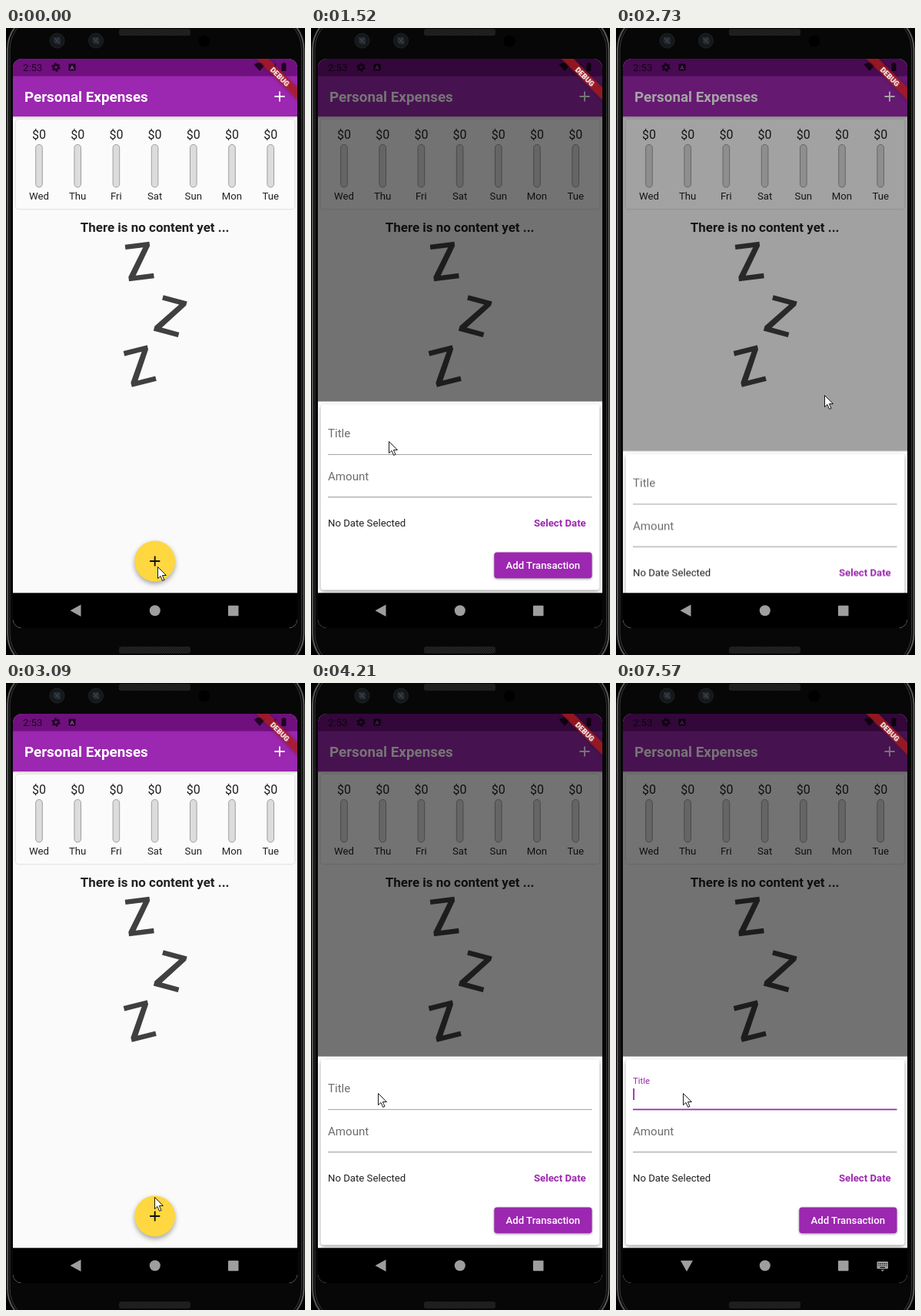
These frames come from a looping animation (389x815 px, 8 s). An HTML page:

```html
<!DOCTYPE html>
<html lang="en">
<head>
<meta charset="utf-8">
<title>Personal Expenses</title>
<style>
html, body { margin: 0; width: 100%; height: 100%; overflow: hidden; background: #000; }
svg { display: block; width: 389px; height: 815px; font-family: Roboto, sans-serif; font-size: 13.19px; }
.mid { text-anchor: middle; }
.bold { font-weight: 700; }
.ink { fill: #212121; }
.hint { fill: #6d6d6d; font-size: 15.07px; }
.purple { fill: #9c27b0; }
.card { fill: #fbfbfb; filter: drop-shadow(0 .8px .8px rgba(0,0,0,.25)); }
.form { fill: #fff; filter: drop-shadow(0 2px 2.5px rgba(0,0,0,.38)); }
.fab { fill: #ffd740; filter: drop-shadow(0 3px 3px rgba(0,0,0,.35)); }
.button { fill: #9c27b0; filter: drop-shadow(0 1.5px 1.5px rgba(0,0,0,.4)); }
.banner { fill: rgba(183,28,28,.74); filter: drop-shadow(0 0 2.5px rgba(0,0,0,.35)); }

#cursor, #sheet, #scrim, #label, #line, #caret, #back, #down { animation: 8s step-end infinite; }
#cursor { animation-name: cursor; }
#sheet { animation-name: sheet; }
#scrim { animation-name: scrim; }
#label { animation-name: label; }
#line { animation-name: line; }
#caret { animation-name: caret; }
#back { animation-name: back; }
#down { animation-name: down; }

@keyframes cursor {
  0% { transform: translate(197px, 700px); }
  11.125% { transform: translate(213px, 702px); }
  12.625% { transform: translate(203px, 678px); }
  14.125% { transform: translate(164px, 614px); }
  15.625% { transform: translate(116px, 552px); }
  17.125% { transform: translate(91px, 528px); }
  19% { transform: translate(101px, 537px); }
  20.75% { transform: translate(105px, 541px); }
  22.25% { transform: translate(107px, 543px); }
  27.75% { transform: translate(214px, 563px); }
  29.625% { transform: translate(256px, 524px); }
  31.125% { transform: translate(269px, 484px); }
  32.625%, 34.125% { transform: translate(271px, 477px); }
  35.625% { transform: translate(267px, 494px); }
  37.125% { transform: translate(226px, 590px); }
  38.625% { transform: translate(193px, 668px); }
  40.125%, 43.25% { transform: translate(201px, 692px); }
  44.75% { transform: translate(190px, 672px); }
  46.25% { transform: translate(118px, 566px); }
  47.75% { transform: translate(75px, 513px); }
  49.625% { transform: translate(81px, 524px); }
  51.125% { transform: translate(86px, 531px); }
  52.625%, 100% { transform: translate(87px, 533px); }
}
@keyframes sheet {
  0% { transform: translateY(250px); }
  3.125% { transform: translateY(95.5px); }
  4.625% { transform: none; }
  34.125% { transform: translateY(64.5px); }
  35.625% { transform: translateY(205px); }
  37.125% { transform: translateY(250px); }
  43.25% { transform: translateY(95.5px); }
  44.75%, 100% { transform: none; }
}
@keyframes scrim {
  0% { opacity: 0; }
  3.125% { opacity: .47; }
  4.625% { opacity: 1; }
  34.125% { opacity: .66; }
  35.625% { opacity: .15; }
  37.125% { opacity: 0; }
  43.25% { opacity: .47; }
  44.75%, 100% { opacity: 1; }
}
@keyframes label {
  0% { transform: translate(22px, 532px); fill: #6d6d6d; }
  59.5% { transform: translate(22px, 529px) scale(.93); fill: #7b5a81; }
  61% { transform: translate(22px, 521.5px) scale(.76); fill: #992ba8; }
  62.5%, 100% { transform: translate(22px, 521px) scale(.75); fill: #9c27b0; }
}
@keyframes line {
  0% { stroke: #a0a0a0; stroke-width: 1px; }
  59.5% { stroke: #956c9e; stroke-width: 1.4px; }
  61%, 100% { stroke: #9c27b0; stroke-width: 1.9px; }
}
@keyframes caret {
  0% { opacity: 0; }
  59.5% { opacity: 1; }
  64% { opacity: 0; }
  70.25% { opacity: 1; }
  75.125% { opacity: 0; }
  81.5% { opacity: 1; }
  88.125% { opacity: 0; }
  94.625%, 100% { opacity: 1; }
}
@keyframes back { 0% { opacity: 1; } 84.625%, 100% { opacity: 0; } }
@keyframes down { 0% { opacity: 0; } 84.625%, 100% { opacity: 1; } }
</style>
</head>
<body>
<svg viewBox="0 0 389 815">
  <defs>
    <clipPath id="screen"><rect x="9" y="40" width="370" height="740" rx="12"/></clipPath>
    <pattern id="mesh" width="3" height="3" patternUnits="userSpaceOnUse">
      <rect width="3" height="3" fill="#262626"/><path d="M0 3L3 0" stroke="#101010"/>
    </pattern>
    <path id="z" d="M-16-24H16V-18.5L-7 17.5H16.5V24H-16.5V18L7-17.5H-16Z"/>
    <path id="plus" d="M-6.6 0H6.6M0-6.6V6.6" fill="none" stroke-width="1.9"/>
    <g id="lens">
      <circle r="9.5" fill="#15181b" stroke="#202427"/>
      <circle r="5" fill="#23282d"/>
      <path d="M-4-4L4 4M3-4L-2 2" stroke="#3a4148" stroke-width="1.3"/>
    </g>
  </defs>

  <!-- phone body -->
  <rect x="2" y="-20" width="385.5" height="855" rx="48" fill="#070707" stroke="#585858" stroke-width="2"/>
  <rect x="5" y="-17" width="379.5" height="849" rx="45" fill="none" stroke="#3a3a3a"/>
  <rect x="147" y="1" width="93" height="9" rx="3" fill="url(#mesh)"/>
  <rect x="147" y="804" width="93" height="9" rx="3" fill="url(#mesh)"/>
  <use href="#lens" x="66.5" y="16.5"/>
  <use href="#lens" x="117" y="16.5"/>
  <circle cx="258" cy="17" r="7.5" fill="#000"/>

  <g clip-path="url(#screen)">
    <rect x="9" y="40" width="370" height="740" fill="#fafafa"/>

    <!-- app bar -->
    <rect x="9" y="114" width="370" height="3" fill="#000" opacity=".12"/>
    <rect x="9" y="40" width="370" height="75" class="purple"/>
    <rect x="9" y="40" width="370" height="22.6" fill="#70107f"/>
    <g opacity=".72">
      <text x="22" y="55.8">2:53</text>
      <circle cx="65" cy="51" r="3.2" fill="none" stroke="#000" stroke-width="2.4"/>
      <circle cx="65" cy="51" r="5" fill="none" stroke="#000" stroke-width="1.6" stroke-dasharray="2.6 2.636"/>
      <rect x="81.5" y="46.5" width="9" height="9" rx="1"/>
      <path d="M322.5 47.5Q330 42 337.5 47.5L330 56Z"/>
      <path d="M342 56H351V46Z"/>
      <path d="M358.5 46H360V45H363V46H364.5V56H358.5Z"/>
    </g>
    <text x="86" y="54" class="mid bold" font-size="8" fill="#9c4aaa">A</text>
    <text x="24" y="95.8" class="bold" font-size="18.84" fill="#fff">Personal Expenses</text>
    <use href="#plus" x="356" y="89" stroke="#fff"/>

    <!-- chart -->
    <rect x="12.8" y="119" width="362.5" height="116" rx="3.8" class="card"/>
    <g id="days"></g>

    <!-- empty list -->
    <text x="193.7" y="264.6" class="mid bold ink" font-size="16.96">There is no content yet ...</text>
    <g fill="#404040">
      <use href="#z" transform="translate(173.5 303.5) rotate(-7)"/>
      <use href="#z" transform="translate(214 374.5) rotate(15)"/>
      <use href="#z" transform="translate(174 439.5) rotate(-14)"/>
    </g>
    <circle cx="193.7" cy="693" r="26.4" class="fab"/>
    <use href="#plus" x="193.7" y="693" stroke="#111"/>

    <rect id="scrim" x="9" y="40" width="370" height="695" fill="rgba(0,0,0,.54)"/>

    <g transform="translate(379 40) rotate(45)">
      <rect x="-60" y="26.4" width="120" height="11.3" class="banner"/>
      <text x=".5" y="35.5" class="mid" font-size="9.6" font-weight="900" fill="#fff">DEBUG</text>
    </g>

    <!-- entry form -->
    <g id="sheet">
      <rect x="9" y="485.5" width="370" height="250" fill="#fff"/>
      <rect x="12.8" y="489.3" width="362.5" height="241.2" rx="3.8" class="form"/>
      <text id="label" class="hint">Title</text>
      <path id="line" d="M22 554.4H365.5" stroke="#a0a0a0"/>
      <rect id="caret" x="22.2" y="527" width="1.8" height="15" class="purple"/>
      <text x="22" y="587.6" class="hint">Amount</text>
      <path d="M22 609.8H365.5" stroke="#929292"/>
      <text x="22" y="647.8" class="ink">No Date Selected</text>
      <text x="290" y="647.8" class="purple bold">Select Date</text>
      <rect x="238.3" y="681.6" width="127.2" height="33.6" rx="3.8" class="button"/>
      <text x="301.8" y="703" class="mid" font-weight="500" fill="#fff">Add Transaction</text>
    </g>

    <!-- navigation bar -->
    <rect x="9" y="734.3" width="370" height="46"/>
    <g fill="#9e9e9e">
      <path id="back" d="M83.5 757.3L97.5 749.5V765Z"/>
      <circle cx="193.8" cy="757.3" r="7"/>
      <rect x="289" y="750.7" width="13.5" height="13.5" rx=".8"/>
      <g id="down">
        <path d="M84 750.8H100L92 765Z"/>
        <rect x="339.5" y="752" width="14.5" height="9.6" rx="1"/>
        <path d="M341.3 754.6H352.5M341.3 757H352.5" stroke="#000" stroke-width="1.2" stroke-dasharray="1.2 1.3"/>
        <path d="M343.5 759.6H350" stroke="#000" stroke-width="1.1"/>
        <path d="M344.5 762.8H349L346.7 765Z"/>
      </g>
    </g>
  </g>

  <path id="cursor" d="M.5.5V15.6L4 12.4 6.6 18.4 9 17.4 6.4 11.5H11.4Z" fill="#fff" stroke="#000" stroke-width=".9"/>
</svg>
<script>
const days = ["Wed", "Thu", "Fri", "Sat", "Sun", "Mon", "Tue"];
document.getElementById("days").innerHTML = days.map((day, i) => {
  const x = 43 + i * 50.2;
  return `<text x="${x}" y="143.6" class="mid ink" font-size="16">$0</text>
    <rect x="${x - 4.3}" y="151.5" width="8.6" height="55.5" rx="4.2" fill="#dcdcdc" stroke="#9e9e9e"/>
    <text x="${x}" y="223" class="mid ink">${day}</text>`;
}).join("");
</script>
</body>
</html>
```
